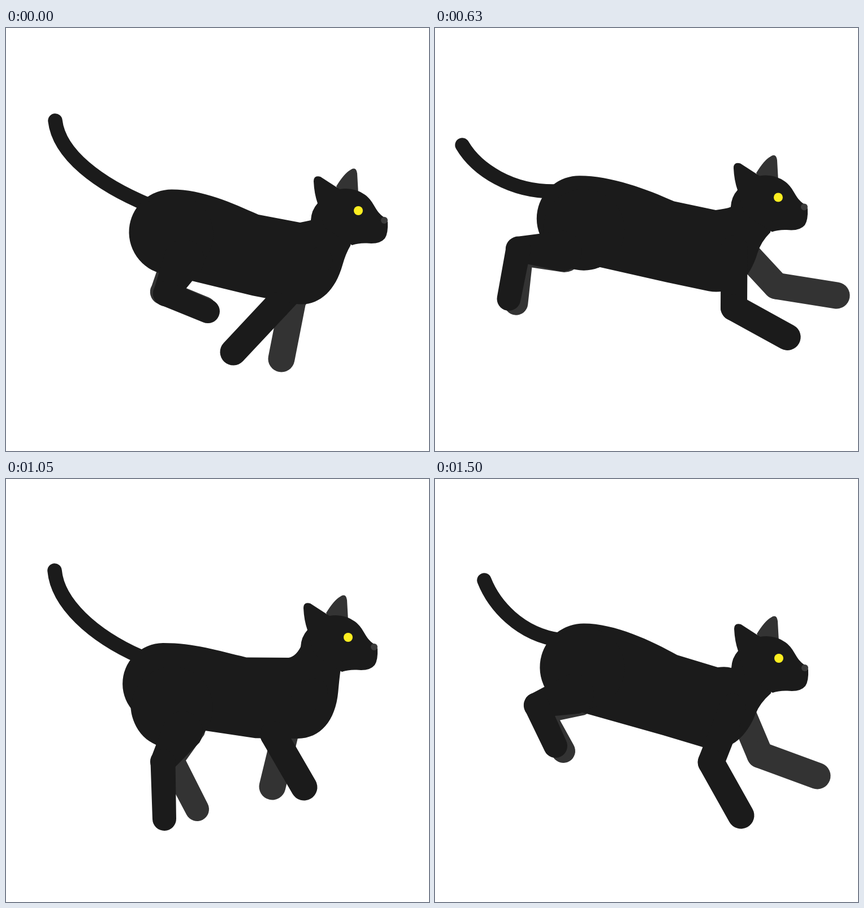
An HTML page with a canvas for the animation above (1.53 s loop, 748 px wide and 748 px high).

```html
<!DOCTYPE html>
<html>
<head>
<meta charset="utf-8">
<title>Running cat</title>
<style>
html, body { margin: 0; height: 100%; overflow: hidden; background: #fff; }
canvas { display: block; }
</style>
</head>
<body>
<canvas id="stage" width="748" height="748"></canvas>
<script>
const ctx = document.getElementById('stage').getContext('2d');
const NEAR = '#1b1b1b', FAR = '#333', LOOP = 1530, STEP = 30, STRIDE = 810;
const QUARTER = Math.PI / 2;

// A smooth closed path through a few points, repeated every period.
function path(period, times, ...points) {
  const n = times.length;
  const time = k => times[(k + n) % n] + Math.floor(k / n) * period;
  const point = k => points[(k + n) % n];
  return now => {
    const t = now % period;
    let i = n - 1;
    while (times[i] > t) i--;
    const span = time(i + 1) - time(i), u = (t - time(i)) / span;
    const slope = (k, axis) => (point(k + 1)[axis] - point(k - 1)[axis]) / (time(k + 1) - time(k - 1)) * span;
    return point(i).map((from, axis) => {
      const d = point(i + 1)[axis] - from, m0 = slope(i, axis), m1 = slope(i + 1, axis);
      return from + u * (m0 + u * (3 * d - 2 * m0 - m1 + u * (m0 + m1 - 2 * d)));
    });
  };
}

// Only hips, withers, eye, paws and tail tip are posed; all joints follow from them.
const bodyPath = path.bind(null, STRIDE, [0, 240, 420, 480, 690, 750]);
const pawPath = path.bind(null, STRIDE, [0, 120, 240, 420, 480, 585, 690, 750]);
const hips = bodyPath([293, 361], [278, 362], [250, 359], [243, 354], [263, 333], [278, 345]);
const withers = bodyPath([520, 344], [500, 316], [495, 296], [492, 298], [500, 333], [512, 349]);
const eye = bodyPath([623, 323], [605, 280], [617, 255], [610, 258], [608, 317], [619, 334]);
const nearFore = pawPath([402, 573], [405, 535], [527, 545], [661, 416], [703, 414], [672, 505], [541, 595], [462, 604]);
const farFore = pawPath([487, 585], [395, 545], [471, 544], [642, 404], [672, 407], [722, 440], [676, 525], [634, 571]);
const nearHind = pawPath([357, 501], [385, 592], [280, 601], [90, 542], [60, 509], [84, 488], [213, 472], [308, 491]);
const farHind = pawPath([351, 496], [420, 560], [338, 584], [104, 552], [69, 499], [96, 492], [227, 481], [324, 488]);
const tailTip = path(LOOP, [0, 240, 480, 750, 1050, 1230, 1500],
  [87, 164], [80, 156], [56, 163], [49, 231], [86, 162], [75, 144], [87, 179]);

const polar = ([x, y], angle, r) => [x + r * Math.cos(angle), y + r * Math.sin(angle)];
const distance = (a, b) => Math.hypot(b[0] - a[0], b[1] - a[1]);
const heading = (a, b) => Math.atan2(b[1] - a[1], b[0] - a[0]);

// Two-bone joint, bending backwards.
function bend(a, b, upper, lower) {
  const d = distance(a, b), angle = heading(a, b);
  const along = (upper ** 2 - lower ** 2 + d * d) / (2 * d);
  const out = Math.sqrt(Math.max(0, upper ** 2 - along ** 2));
  return polar(polar(a, angle, along), angle + QUARTER, out);
}

function disc([x, y], r, color) {
  ctx.fillStyle = color;
  ctx.beginPath();
  ctx.arc(x, y, r, 0, 7);
  ctx.fill();
}

function capsule(a, ra, b, rb, color) {
  const angle = heading(a, b);
  ctx.fillStyle = color;
  ctx.beginPath();
  ctx.arc(...a, ra, angle + QUARTER, angle + 3 * QUARTER);
  ctx.arc(...b, rb, angle - QUARTER, angle + QUARTER);
  ctx.fill();
}

function foreLeg(shoulder, upper, paw, color) {
  const elbow = bend(shoulder, paw, upper, 108);
  capsule(shoulder, 23.5, elbow, 23.5, color);
  capsule(elbow, 23.5, paw, 23.5, color);
}

function hindLeg(hip, paw, color) {
  const reach = distance(hip, paw);
  const hock = bend(hip, paw, 58 + reach / 3, 44 + .24 * reach);
  const drop = Math.min(46, Math.max(0, (reach - 145) * .48));
  const thigh = [hip[0] + drop * .35, hip[1] + drop * .93];
  const angle = heading(thigh, hock);
  const knee = polar(polar(thigh, angle, .4 * distance(thigh, hock)), angle - QUARTER, 25);
  disc(thigh, 72, color);
  capsule(knee, 36, hock, 22.5, color);
  capsule(hock, 22, paw, 21, color);
}

// A short tail curls more.
function drawTail(base, tip) {
  const length = distance(base, tip);
  const angle = heading(tip, base) - .34 - (222 - length) * .0038;
  ctx.strokeStyle = NEAR;
  ctx.lineWidth = 25.5;
  ctx.lineCap = 'round';
  ctx.beginPath();
  ctx.moveTo(...tip);
  ctx.bezierCurveTo(...polar(tip, angle + 1.06, .27 * length), ...polar(base, angle, -.43 * length), ...base);
  ctx.stroke();
}

function drawTorso([hx, hy], w, [ex, ey], tilt, local) {
  const r = 72 + 20 * tilt;
  ctx.fillStyle = NEAR;
  ctx.beginPath();
  ctx.arc(hx, hy, r, QUARTER + tilt, 3 * QUARTER);
  ctx.bezierCurveTo(hx + 55, hy - r, ...local(-125, -13), ...local(-75, -1));
  ctx.lineTo(...w);
  ctx.quadraticCurveTo(ex - 93, w[1] - 2, ex - 84, ey + 17);
  ctx.quadraticCurveTo(ex - 83, ey - 1, ex - 72, ey - 13);
  ctx.lineTo(ex, ey);
  ctx.lineTo(ex - 14, ey + 62);
  ctx.quadraticCurveTo(...local(89, 40), ...local(87, 61));
  ctx.bezierCurveTo(...local(82, 112), ...local(55, 143), ...local(15, 143));
  ctx.lineTo(...local(-60, 142));
  ctx.fill();
}

// Head shapes are placed relative to the eye.
const farEar = new Path2D('M-39-43Q-25-66-14-72Q-4-79-2-66L0-30L-30-30Z');
const head = new Path2D('M-72-13Q-78-30-79-52Q-79-63-67-60L-33-38Q-8-42 12-28C30-14 28 0 46 12L52 20Q53 40 47 49Q38 60 15 57.5Q0 57-11 61L-60 30Z');

function fillAt([x, y], shape, color) {
  ctx.save();
  ctx.translate(x, y);
  ctx.fillStyle = color;
  ctx.fill(shape);
  ctx.restore();
}

function draw(t) {
  const h = hips(t), w = withers(t), e = eye(t);
  const tilt = 1.4 * heading(h, w) + .28;
  const cos = Math.cos(tilt), sin = Math.sin(tilt);
  const local = (x, y) => [w[0] + x * cos - y * sin, w[1] + x * sin + y * cos];

  ctx.fillStyle = '#fff';
  ctx.fillRect(0, 0, 748, 748);
  hindLeg(h, farHind(t), FAR);
  foreLeg(local(58, 58), 90, farFore(t), FAR);
  fillAt(e, farEar, FAR);
  drawTail([h[0] - 41, h[1] - 48], tailTip(t));
  drawTorso(h, w, e, tilt, local);
  hindLeg(h, nearHind(t), NEAR);
  foreLeg(local(45, 60), 105, nearFore(t), NEAR);
  fillAt(e, head, NEAR);
  disc(e, 8, '#fdee21');
  disc([e[0] + 46, e[1] + 17], 6, '#3b3b3b');
}

function frame() {
  draw(Math.floor(performance.now() % LOOP / STEP) * STEP);
  requestAnimationFrame(frame);
}
frame();
</script>
</body>
</html>
```
